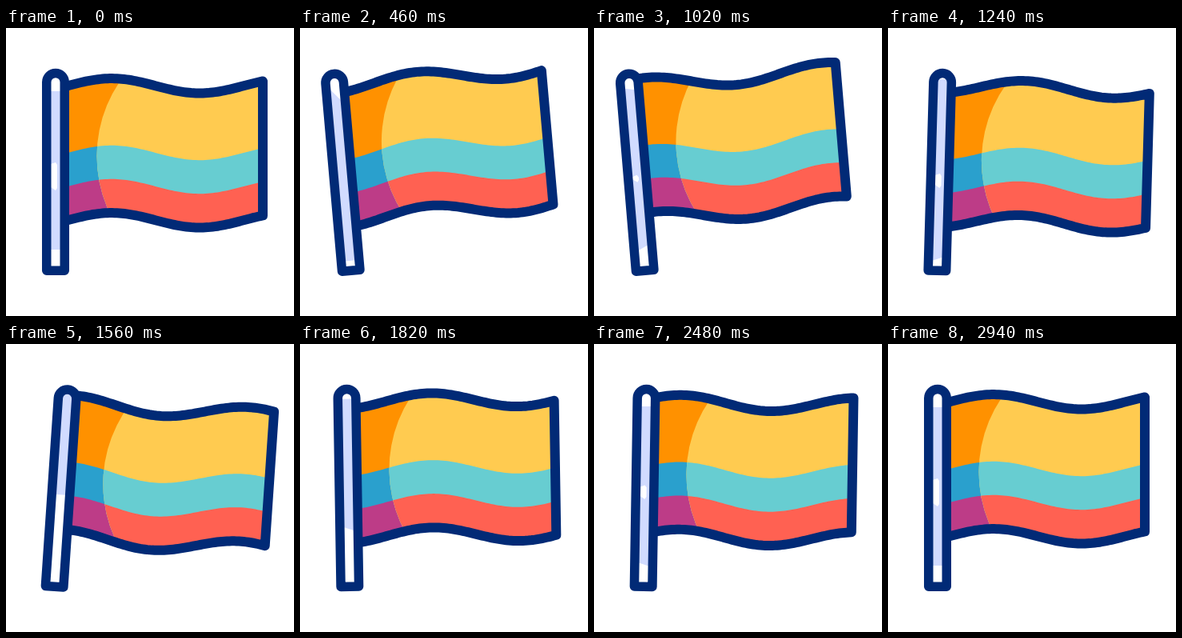
Write an HTML page that moves like this. It is 360 by 360 pixels and loops after 3.6 s.

```html
<!DOCTYPE html>
<html lang="en">
<head>
<meta charset="utf-8">
<title>Waving flag</title>
<style>
  html, body { margin: 0; width: 100%; height: 100%; overflow: hidden; background: #fff; }
  svg { display: block; width: 100vw; height: 100vh; }
  .line { stroke: #012a76; stroke-linejoin: round; }
</style>
</head>
<body>
<svg viewBox="0 0 360 360">
  <defs>
    <clipPath id="lit"><circle cx="278.5" cy="160" r="165"/></clipPath>
  </defs>
  <g id="flag">
    <g id="shade"></g>
    <g id="light" clip-path="url(#lit)"></g>
    <path id="edge" class="line" fill="none" stroke-width="12"/>
    <path d="M50.75 303.3V67.75a11.25 11.25 0 0 1 22.5 0V303.3Z" fill="#fff"/>
    <path id="gloss" fill="#d1dbff"/>
    <path id="gap" fill="#fff"/>
    <path class="line" d="M50.75 303.3V67.75a11.25 11.25 0 0 1 22.5 0V303.3Z" fill="none" stroke-width="11.5"/>
  </g>
</svg>
<script>
const LOOP = 3600, MOVE = 2880;
const LEFT = 70, RIGHT = 321, AMP = 9.2, WAVE = 220, CREST = 132, CYCLES = 3;
const LEVELS = [72.3, 156, 198, 240.3];
const DARK = ['#ff9100', '#2aa0cd', '#bd3c87'];
const BRIGHT = ['#ffcb50', '#67cdd1', '#ff6152'];

// time, degrees
const SWAY = [[0, 0], [800, -8.1], [1450, 4.6], [1990, -2.5], [2400, 1.05], [2750, 0], [LOOP, 0]];

// time, gloss top, gloss bottom, gap top, gap bottom, top slant, bottom slant
const GLOSS = [
  [0, 79, 277, 168, 203, 0, 0],
  [460, 76, 291, 185, 185, 14, 0],
  [800, 85, 264, 185, 185, 5, -7],
  [1240, 64, 291, 182, 200, 0, -4],
  [1560, 60, 188, 188, 188, 0, 0],
  [2080, 77, 270, 185, 185, 0, 8],
  [MOVE, 79, 277, 168, 203, 0, 0],
  [LOOP, 79, 277, 168, 203, 0, 0]
];

const byId = id => document.getElementById(id);
const linear = u => u;
const sine = u => (1 - Math.cos(Math.PI * u)) / 2;

// cubic-bezier(.42, 0, .58, 1)
function easeInOut(u) {
  let lo = 0, hi = 1;
  for (let i = 0; i < 24; i++) {
    const s = (lo + hi) / 2, r = 1 - s;
    if (1.26 * s * r * r + 1.74 * s * s * r + s * s * s < u) lo = s; else hi = s;
  }
  return lo * lo * (3 - 2 * lo);
}

function sample(table, t, ease) {
  const i = Math.max(1, table.findIndex(row => row[0] >= t));
  const a = table[i - 1], b = table[i];
  const k = ease((t - a[0]) / (b[0] - a[0]));
  return a.slice(1).map((v, j) => v + (b[j + 1] - v) * k);
}

function addStripes(parent, colors) {
  return colors.map(color => {
    const path = document.createElementNS('http://www.w3.org/2000/svg', 'path');
    path.setAttribute('fill', color);
    parent.append(path);
    return path;
  });
}

const shade = addStripes(byId('shade'), DARK);
const light = addStripes(byId('light'), BRIGHT);

function band(top, bottom, crest) {
  const upper = [], lower = [];
  for (let i = 0; i <= 84; i++) {
    const x = LEFT + (RIGHT - LEFT) * i / 84;
    const dy = -AMP * Math.cos(2 * Math.PI * (x - crest) / WAVE);
    upper.push(x.toFixed(2) + ' ' + (top + dy).toFixed(2));
    lower.unshift(x.toFixed(2) + ' ' + (bottom + dy).toFixed(2));
  }
  return 'M' + upper.concat(lower).join('L') + 'Z';
}

function draw(t) {
  const crest = CREST + WAVE * CYCLES * easeInOut(Math.min(t / MOVE, 1));
  // Each stripe runs to the hem so that no seam shows between colours.
  for (let i = 0; i < 3; i++) {
    const d = band(LEVELS[i], LEVELS[3], crest);
    shade[i].setAttribute('d', d);
    light[i].setAttribute('d', d);
  }
  byId('edge').setAttribute('d', band(LEVELS[0], LEVELS[3], crest));

  const [top, bottom, gapTop, gapBottom, topSlant, bottomSlant] = sample(GLOSS, t, linear);
  byId('gloss').setAttribute('d',
    `M56 ${top}L68 ${top + topSlant}V${bottom + bottomSlant}L56 ${bottom}Z`);
  byId('gap').setAttribute('d', gapBottom - gapTop < 1 ? '' :
    `M56 ${gapTop + 2}L62 ${gapTop}L64 ${gapTop + 3}V${gapBottom - 3}L62 ${gapBottom}L56 ${gapBottom - 4}Z`);

  const [angle] = sample(SWAY, t, sine);
  byId('flag').setAttribute('transform', `rotate(${angle} 62 283)`);
}

const start = performance.now();
function tick(now) {
  draw(Math.max(0, now - start) % LOOP);
  requestAnimationFrame(tick);
}
draw(0);
requestAnimationFrame(tick);
</script>
</body>
</html>
```
